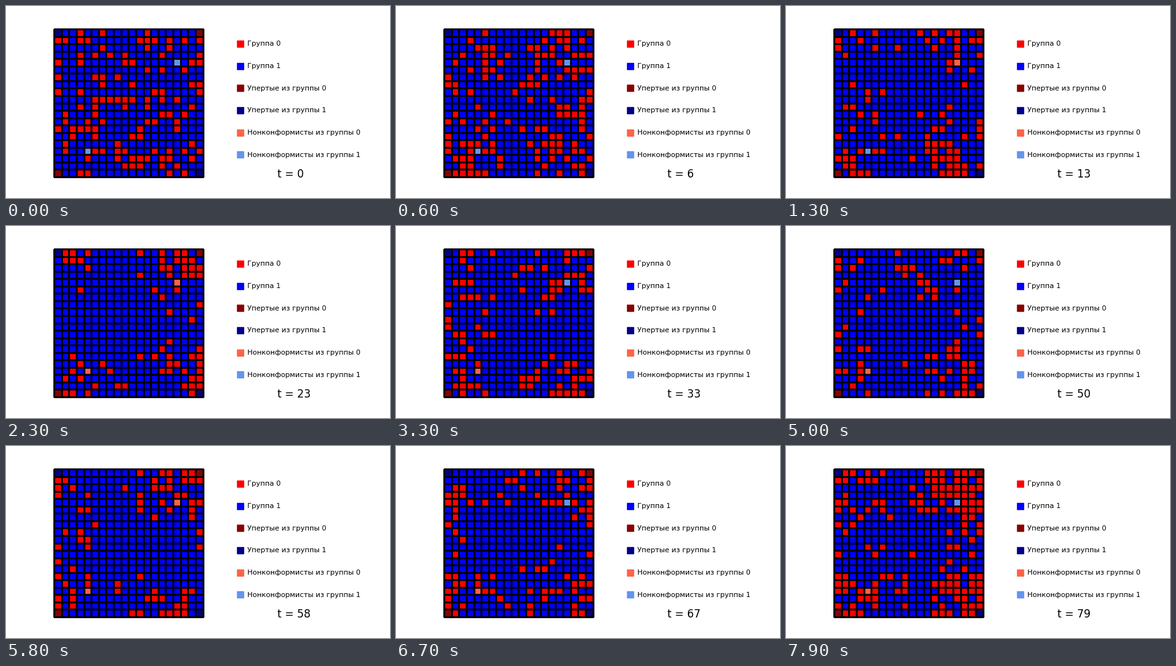
Recreate the animation shown at these times as a matplotlib script. Size 600 px wide and 300 px high, loop 8 s.

```python
import numpy as np
import matplotlib.pyplot as plt
from matplotlib.animation import FuncAnimation
from matplotlib.colors import ListedColormap

N, FRAMES = 20, 80
COLORS = ["red", "blue", "darkred", "darkblue", "tomato", "cornflowerblue"]
LABELS = ["Группа 0", "Группа 1",
          "Упертые из группы 0", "Упертые из группы 1",
          "Нонконформисты из группы 0", "Нонконформисты из группы 1"]
STUBBORN = {(0, 0): 1, (0, -1): 0, (-1, 0): 0, (-1, -1): 1}
REBELS = [(4, 16), (16, 4)]
ROW, COL = np.mgrid[:N, :N]


def ring(x, centre):
    """Distance along an axis that wraps around."""
    return (x - centre + N / 2) % N - N / 2


def red_share(t):
    """Group 0 gathers around the wrapped corner and grows near the end."""
    level = np.interp(t, [0, 20, 60, FRAMES - 1], [0.5, 0.5, 0.5, 0.95])
    d2 = ring(ROW, 0) ** 2 + ring(COL, 18) ** 2
    return 0.02 + level * np.exp(-d2 / 49)


def settle(group):
    for cell, g in STUBBORN.items():
        group[cell] = g
    return group


def simulate(seed=7, pull=0.2):
    """Each cell copies a random neighbour; rebels take the opposite."""
    rng = np.random.default_rng(seed)
    group = settle((rng.random((N, N)) > 0.26).astype(int))
    for cell in REBELS:
        group[cell] = 1
    states = [group]
    while len(states) < FRAMES:
        dr, dc = rng.integers(-1, 2, size=(2, N, N))
        heard = group[(ROW + dr) % N, (COL + dc) % N]
        drawn = rng.random((N, N)) > red_share(len(states))
        group = np.where(rng.random((N, N)) < pull, drawn, heard).astype(int)
        for cell in REBELS:
            group[cell] = 1 - heard[cell]
        states.append(settle(group))
    return states


kind = np.zeros((N, N), int)
for cell in STUBBORN:
    kind[cell] = 1
for cell in REBELS:
    kind[cell] = 2
states = [2 * kind + g for g in simulate()]

fig, (board, key) = plt.subplots(1, 2, figsize=(6, 3), dpi=100)
fig.subplots_adjust(left=0.125, right=0.9, bottom=0.11, top=0.88, wspace=0)

mesh = board.pcolormesh(states[0], cmap=ListedColormap(COLORS), vmin=-0.5, vmax=5.5,
                        edgecolors="black", linewidth=1, clip_on=False)
board.set(xlim=(0, N), ylim=(N, 0))
board.axis("off")

key.set(xlim=(0, 1), ylim=(0, 1))
key.axis("off")
for i, (color, label) in enumerate(zip(COLORS, LABELS)):
    y = 0.9 - 0.15 * i
    key.scatter(0.25, y, s=60, marker="s", color=color)
    key.text(0.3, y - 0.014, label, fontsize=8, family="DejaVu Sans")
clock = key.text(0.5, -0.004, "t = 0", fontsize=12, family="DejaVu Sans")


def update(t):
    mesh.set_array(states[t])
    clock.set_text(f"t = {t}")
    return mesh, clock


anim = FuncAnimation(fig, update, frames=FRAMES, interval=100,
                     repeat=True, repeat_delay=0)
plt.show()
```
